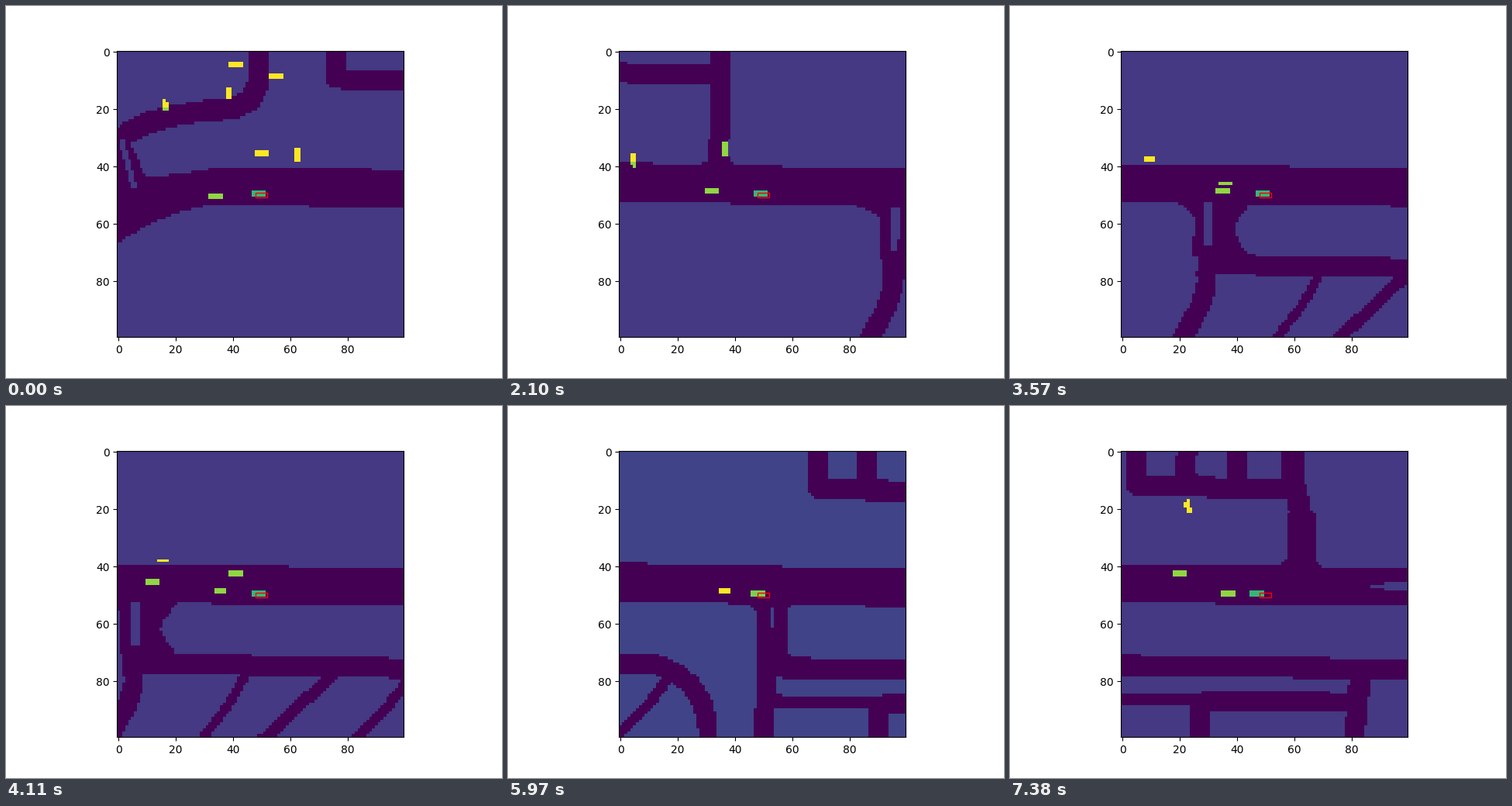
Recreate the animation shown at these times as a matplotlib script. Size 640 by 480 pixels, loop 7.41 s.

```python
import numpy as np
import matplotlib.pyplot as plt
from matplotlib.animation import FuncAnimation
from matplotlib.patches import Rectangle
from matplotlib.path import Path

FRAMES, INTERVAL = 247, 30
N = 100                       # cells per side of the view
RES = 5                       # map samples per cell
X0, Y0, W, H = -6, -4, 446, 110
ROAD, LAND = 0, 1
TOP, BOTTOM = 40.4, 53.75     # edges of the main road
LENGTH, WIDTH = 4.5, 1.75     # vehicle size

world = np.full((H * RES, W * RES), LAND, dtype=np.uint8)


def window(lo, hi):
    """Map view and sample positions inside a bounding box."""
    x1, y1 = np.maximum((np.subtract(lo, (X0, Y0)) * RES).astype(int), 0)
    x2, y2 = np.maximum((np.subtract(hi, (X0, Y0)) * RES).astype(int) + 1, 0)
    part = world[y1:y2, x1:x2]
    iy, ix = np.indices(part.shape)
    return part, X0 + (x1 + ix + .5) / RES, Y0 + (y1 + iy + .5) / RES


def area(points, kind=ROAD):
    pts = np.array(points, float)
    part, x, y = window(pts.min(0), pts.max(0))
    inside = Path(pts).contains_points(np.column_stack([x.ravel(), y.ravel()]))
    part[inside.reshape(x.shape)] = kind


def line(width, *points, kind=ROAD):
    """Polyline with round joins and ends."""
    pts, r = np.array(points, float), width / 2
    for a, b in zip(pts, pts[1:]):
        part, x, y = window(np.minimum(a, b) - r, np.maximum(a, b) + r)
        d = b - a
        k = np.clip(((x - a[0]) * d[0] + (y - a[1]) * d[1]) / (d @ d), 0, 1)
        part[np.hypot(x - a[0] - k * d[0], y - a[1] - k * d[1]) < r] = kind


def stem(x1, x2, y1, y2, top=(0, 0), bottom=(0, 0), reach=3):
    """Vertical road whose left and right edges flare out at its ends."""
    y = np.linspace(y1, y2, 60)
    near_top = np.clip(1 - (y - y1) / reach, 0, 1) ** 1.5
    near_bottom = np.clip(1 - (y2 - y) / reach, 0, 1) ** 1.5
    left = x1 - top[0] * near_top - bottom[0] * near_bottom
    right = x2 + top[1] * near_top + bottom[1] * near_bottom
    area([*zip(left, y), *zip(right[::-1], y[::-1])])


# Main road, widening towards its west end
x = np.linspace(X0, X0 + W, 500)
flare = np.clip((36 - x) / 36, 0, None)
area([*zip(x, TOP + 5.7 * flare ** .8),
      *zip(x[::-1], (BOTTOM + 14.5 * flare ** 1.7)[::-1])])

# North-west bend and its link to the main road
line(7.6, (48.9, -4), (48.9, 11), (46, 17), (40.5, 20), (27, 21.6),
     (17.5, 23.5), (10.5, 25.6), (3, 29.5))
area([(-6, 27), (3, 29), (4.5, 32.3), (9.9, 44.8), (10, 60), (-6, 60)])
line(2, (1.5, 32.5), (6, 48), kind=LAND)

# North loop
line(7, (75.7, -4), (75.7, 9.1), (127.7, 9.1))
stem(124.1, 131.3, -4, TOP + .2, bottom=(2.5, 2.5))

# South junction: two legs, one street and a road leaving south-west
stem(184.4, 188.2, BOTTOM - .2, 72, top=(7, 0), bottom=(0, 1), reach=5)
stem(191, 198.2, BOTTOM - .2, 72, top=(0, 6), bottom=(.5, 6), reach=10)
line(6.9, (189, 72), (189.2, 82), (187.3, 89), (181.5, 100), (179, 104))

# Street ending in a quarter turn to the south
a = np.linspace(0, np.pi / 2, 16)
bend = zip(275 + 23.2 * np.sin(a), 98.4 - 23.2 * np.cos(a))
line(6.95, (189, 75.15), *bend, (298.2, 104))

# Diagonal lanes
line(3.2, (229, 77), (222.4, 89), (211, 104))
line(4.3, (259.5, 77), (231.5, 104))
line(3.7, (284.5, 80), (277, 90), (264, 103.5))

# Second southern road and the parallel streets east of it
stem(314.3, 325.5, BOTTOM - .2, 72.5, top=(4, .7), bottom=(0, 2))
stem(314.5, 321.6, 72, 104)
line(.4, (319.9, 55), (319.9, 69), kind=LAND)
line(7.1, (320, 75.8), (442, 75.8))
line(4.1, (320, 87.45), (357, 87.45))
line(6.9, (361, 87.55), (411, 87.55))
stem(354.5, 361.5, 88, 104, top=(1, 0), reach=4)
line(7.4, (414, 76), (411.7, 104))

# North-east comb
for i in range(3):
    stem(331.1 + 17.5 * i, 338.1 + 17.5 * i, -4, 11, bottom=(0, 1))
line(7.2, (334.7, 11), (334.7, 12.8), (384, 13.8))
line(8, (389.2, -4), (389.2, 11), (391.2, 17), (392.4, 24))
stem(387.5, 397.5, 22, TOP + .2, bottom=(3, 3))

# Central reservation
line(.8, (417.5, 46.9), (424, 46.7), kind=LAND)
line(2.9, (423, 46.7), (442, 46.6), kind=LAND)

# Standing vehicles: x and y on the map, heading
PARKED = [
    (40.7, 4.75, -10), (54.8, 8.5, 0), (38.4, 14.6, 90), (16.4, 19.2, 75),
    (50.25, 35.6, 0), (98.1, 39.3, 90), (129.5, 34.85, 90),
    (177.7, 11.1, 65), (195.3, 46.7, 0), (352.85, 20.3, 70),
]

# Moving vehicles: time, x and y in the view, velocity, heading
MOVING = [
    (20, 36.6, 37.7, -1.32, .06, 90),
    (120, 10.5, 38, .324, .027, 0),
    (137, 41.5, 43, -2.7, 0, 0),
    (246, 20.5, 43, -2.7, 0, 0),
]
LIFE = 30

# Road slope in the view, and the vehicle behind: time, value(s)
HEADING = np.array([(0, .018), (37, .026), (137, .015), (175, .016),
                    (199, .021), (246, .015)]).T
BEHIND = np.array([(0, 34.5, 51), (37, 30, 49), (100, 35, 49.3),
                   (175, 37, 49), (246, 37.5, 50)]).T

col, row = np.meshgrid(np.arange(N) + .5, np.arange(N) + .5)


def vehicle(px, py, x, y, heading=0):
    """Cells whose centres lie on a vehicle."""
    c, s = np.cos(np.radians(heading)), np.sin(np.radians(heading))
    along = (px - x) * c + (py - y) * s
    across = (py - y) * c - (px - x) * s
    return (abs(along) < LENGTH / 2) & (abs(across) < WIDTH / 2)


def in_range(dx, dy):
    return dx < 34 and np.hypot(dx, dy) < 48


def occupancy(t):
    travel = 1.326 * t + 6e-5 * t ** 2
    lateral = .45 * np.exp(-t / 15) - .05
    slope = np.interp(t, *HEADING)
    wx = travel + col + slope * (row - 50)
    wy = row - slope * (col - 50) - lateral
    ix = np.clip(((wx - X0) * RES).astype(int), 0, W * RES - 1)
    iy = np.clip(((wy - Y0) * RES).astype(int), 0, H * RES - 1)
    grid = world[iy, ix].astype(float)

    cars = vehicle(col, row, *(np.interp(t, BEHIND[0], v) for v in BEHIND[1:]))
    for x, y, heading in PARKED:
        if in_range(x - travel - 50, y - 50):
            cars |= vehicle(wx, wy, x, y, heading)
    for seen, x, y, vx, vy, heading in MOVING:
        dt = t - seen
        if abs(dt) <= LIFE and x + vx * dt < 84:
            cars |= vehicle(col, row, x + vx * dt, y + vy * dt, heading)
    grid[cars] += 5

    # The tracked vehicle slowly falls behind its predicted box
    ego = np.floor(49.9 - (t / 150) ** 2) + .5
    grid[vehicle(col, row, ego, 50)] = 4
    return grid


fig, ax = plt.subplots(figsize=(6.4, 4.8), dpi=100)
image = ax.imshow(occupancy(0), cmap="viridis")
ax.add_patch(Rectangle((48, 49.25), 4, 1.5, fill=False, edgecolor="red", linewidth=1))


def update(t):
    grid = occupancy(t)
    image.set_data(grid)
    image.set_clim(0, grid.max())
    return [image]


anim = FuncAnimation(fig, update, frames=FRAMES, interval=INTERVAL,
                     repeat=True, repeat_delay=0, blit=False)
plt.show()
```
